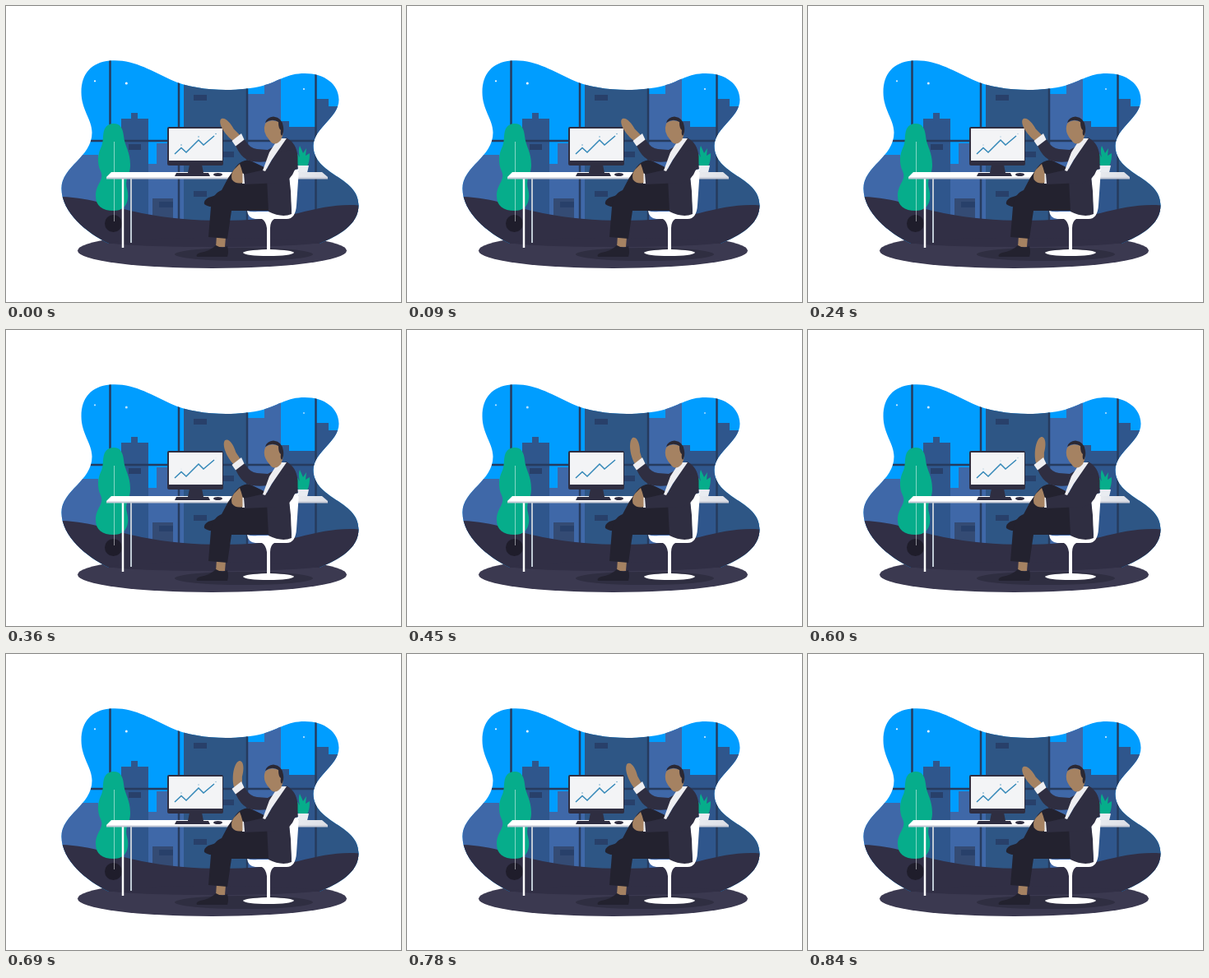
An HTML page for the animation above (0.87 s loop, 480 by 360 pixels).

```html
<!DOCTYPE html>
<html lang="en">
<head>
<meta charset="utf-8">
<title>Waving at the office desk</title>
<style>
  html, body { margin: 0; width: 100%; height: 100%; overflow: hidden; background: #fff; }
  svg { display: block; width: 480px; height: 360px; }
  .dark { fill: #2f2e41; }
  .darker { fill: #23222f; }
  .skin { fill: #a58262; }
  .white { fill: #fff; }
  .shirt { fill: #eeeef1; }
  .green { fill: #06ad8b; }
</style>
</head>
<body>
<svg viewBox="0 0 480 360">
  <defs>
    <clipPath id="blob">
      <path d="M126 66.500C154 64 177 79 201 90C232 104 280 105 312 97C333 91 341 82 363 82C387 82 404.500 95 404.500 114C404.500 136 374 148 373.500 170C373.500 206 428.500 207 428.500 242C428.500 266 405 279 381 289L125 289C98 276 67.500 251 67.500 222C67.500 195 104.500 184 104.500 154C104.500 138 91.500 126 91.500 105C91.500 82 104 68.500 126 66.500Z"/>
    </clipPath>
    <linearGradient id="top">
      <stop offset=".6" stop-color="#fff"/>
      <stop offset="1" stop-color="#dcdfe6"/>
    </linearGradient>
  </defs>

  <ellipse cx="250.500" cy="297.500" rx="163.500" ry="21.500" fill="#3b3950"/>

  <g clip-path="url(#blob)">
    <path fill="#009dff" d="M60 60h380v240H60z"/>
    <g id="stars" class="white">
      <circle cx="108" cy="91.3" r="1.1"/>
      <circle cx="146.3" cy="94" r="1.5"/>
      <circle cx="362" cy="101" r=".9"/>
    </g>
    <path fill="#3f68a8" d="M60 181h52v90H60zM183 167h33v100h-33zM172 192h12v80h-12zM294 107h20v160h-20zM314 80h20v187h-20zM112 190h28v70h-28z"/>
    <path fill="#2f568c" d="M140 137h12v-7h8v7h13v130h-33zM334 140h10v7h32v120h-42zM376 113h16v9h18v45h-34z"/>
    <path fill="#2e5685" d="M216 80h77v190h-77zM376 164h60v100h-60z"/>
    <path fill="#344b74" d="M178 234h25v30h-25z"/>
    <path fill="#28406a" d="M228 108h16v7h-16zM149 168h15v7h-15zM262 177h15v7h-15zM228 225h16v7h-16zM186 238h17v7h-17z"/>
    <path stroke="#263b5e" stroke-width="2.500" fill="none" d="M126.500 60V270M210 80V270M293 80V270M376.500 75V270M90 164H400"/>
    <path fill="#312f45" d="M60 232C104 232 128 245 165 252C225 264 300 264 355 252C385 245 404 240 436 243V300H60Z"/>
  </g>
  <path fill="#312f45" d="M123 287.500C170 280 330 280 383 287.500C350 295 150 295 123 287.500Z"/>
  <ellipse cx="289" cy="302" rx="84" ry="8" class="dark"/>

  <!-- tall plant -->
  <circle cx="130.500" cy="264.500" r="10.500" fill="#1f1d2b"/>
  <path class="green" d="M131 143C139 143 142 149 143 158C144 170 151 177 151 193C151 207 144 209 147 222C151 238 145 249 131 249C117 249 109 243 109 231C109 216 120 212 115 201C110 190 112 180 115 173C119 165 117 160 119 152C121 145 126 143 131 143Z"/>
  <path stroke="#fff" stroke-opacity=".5" d="M131.500 165V262"/>

  <!-- small plant -->
  <path class="green" d="M356 195C351 187 352 182 353 178L357 184C355 176 356 173 357 170L361 179L365 173L364 182L369 179C369 187 368 191 366 195Z"/>
  <path fill="#e9ecf1" d="M354 194h14l-3 13h-8z"/>

  <!-- desk -->
  <path stroke="#bfc9d4" stroke-width="2" d="M152 209V288"/>
  <path stroke="#fff" stroke-width="2.500" d="M142 209V294"/>
  <path fill="url(#top)" d="M128 202H384L391 208V210H122V208Z"/>
  <path fill="#c6cad6" d="M122 208.500H391V210.500H122Z"/>

  <!-- computer -->
  <path class="dark" d="M223 193h15l2 10h6l2 4h-43l2-4h14z"/>
  <rect class="dark" x="196" y="147" width="68" height="47" rx="2"/>
  <path fill="#f3f4f6" d="M198 149h65v39h-65z"/>
  <path fill="none" stroke="#3488b8" stroke-width="1.500" d="M205 180L213 172.500L219 178L234 163L240 169L253 158"/>
  <g id="dots" fill="#3488b8">
    <circle cx="213" cy="169" r=".8"/>
    <circle cx="234" cy="159" r=".8"/>
    <circle cx="255" cy="155.500" r=".8"/>
  </g>
  <ellipse class="dark" cx="257.500" cy="205" rx="5.500" ry="2"/>

  <!-- legs -->
  <path class="skin" d="M256 279L267 281L266 293H255Z"/>
  <path class="darker" d="M255 291Q263 296 269 292Q271 299 269 305H232Q230 302 236 300Q248 298 255 291Z"/>
  <path class="darker" d="M263 224Q258 230 246 233Q240 236 241 241Q247 246 258 243Z"/>
  <path class="darker" d="M296 187.500Q285 187 279 196L270 209L262 224Q251 228 249 244L246 281L269 283L274 249H322V200Z"/>

  <!-- chair -->
  <path class="white" d="M293 249Q298 251 306 250H347Q345 225 344 207Q347 199 356 198L353 242Q352 259 341 259H326Q321 262 321 270V296Q349 297 350 300Q346 304 319 304Q291 304 288 300Q290 297 317 296V270Q316 262 311 259H303Q294 258 293 249Z"/>

  <!-- body -->
  <path class="dark" d="M340 160Q353 166 354.500 183V198Q347 199 344 207L346 225L347 253Q335 258 319 250L317 210Q314 201 322 189Z"/>
  <path class="dark" d="M329 169L318 175L305 174Q296 173 289.500 162L279 170Q285 183 293 187Q302 191 318 189Z"/>
  <path class="dark" d="M350 174Q356 187 351 199Q346 213 334 215L289 217L288 205L319 198L331 178Z"/>
  <path class="shirt" d="M331 161L320 178L312 200L315 201L323 187L341 161Z"/>
  <path class="shirt" d="M286 203L289 204L290 216L287 216Z"/>
  <path class="skin" d="M284 192Q286 197 287.500 203V215Q279 217 274.500 211Q273 204 277 199Z"/>
  <path class="skin" d="M315 143Q322 136 334 142Q338 150 336 158L334 163Q326 172 320 163Q311 153 315 143Z"/>
  <path fill="#2b2833" d="M315 142Q317 135 325 134.500Q336 136 337 147Q338 154 335 158Q333 156 334 151Q331 149 331 141Q323 136 315 142Z"/>
  <path id="hand" class="skin" d="M277 162C273 150 275 133 281 130C287 129 288 140 286 149L287 162Z"/>
  <path class="shirt" d="M274.500 164L286 155L289.500 162.500L279 170.500Z"/>
</svg>
<script>
  const LOOP = 870;
  const byId = id => document.getElementById(id);
  const hand = byId("hand"), stars = byId("stars"), dots = byId("dots");

  const ease = (from, to, t) => {
    const p = Math.min(1, Math.max(0, (t - from) / (to - from)));
    return p * p * (3 - 2 * p);
  };

  function draw(now) {
    const t = now % LOOP;
    const raised = ease(240, 600, t) - ease(690, 840, t);
    hand.setAttribute("transform", `rotate(${-40 + 44 * raised} 282 162)`);
    const glow = Math.cos(2 * Math.PI * t / LOOP);
    stars.setAttribute("opacity", 0.85 + 0.15 * glow);
    dots.setAttribute("opacity", 0.4 + 0.4 * glow);
    requestAnimationFrame(draw);
  }
  draw(performance.now());
</script>
</body>
</html>
```
